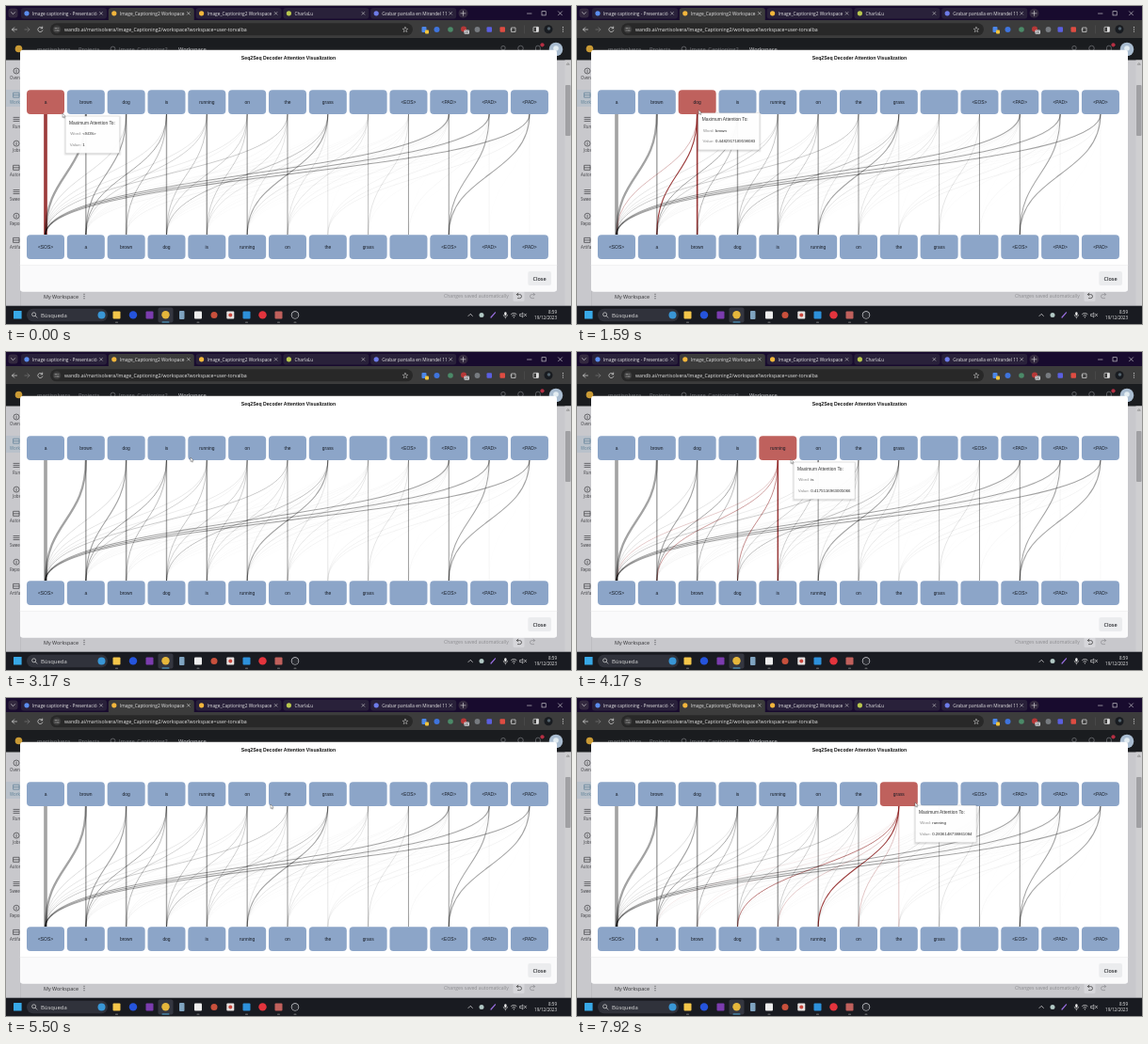
Write an HTML page that moves like this. It is 600 by 338 pixels and loops after 8 s.

```html
<!DOCTYPE html>
<html lang="es">
<head>
<meta charset="utf-8">
<title>Decoder attention</title>
<style>
html, body { margin: 0; width: 100%; height: 100%; overflow: hidden; background: #c8c8cc; }
svg { display: block; width: 100%; height: 100%; }
text { font-family: "Liberation Sans", Arial, sans-serif; white-space: pre; }
.ui text, text.ui { font-family: "Open Sans", "Noto Sans", sans-serif; }
</style>
</head>
<body>
<svg id="stage" viewBox="0 0 600 338"></svg>
<script>
const NS = 'http://www.w3.org/2000/svg';
const stage = document.getElementById('stage');

function add(parent, tag, attrs, content) {
  const el = document.createElementNS(NS, tag);
  for (const k in attrs) el.setAttribute(k, attrs[k]);
  if (content !== undefined) el.textContent = content;
  parent.appendChild(el);
  return el;
}
const group = (parent = stage, attrs = {}) => add(parent, 'g', attrs);
const rect = (g, x, y, w, h, fill, rx = 0) =>
  add(g, 'rect', { x, y, width: w, height: h, fill, rx });
const dot = (g, cx, cy, r, fill) => add(g, 'circle', { cx, cy, r, fill });
const line = (g, d, stroke, w = 0.7) =>
  add(g, 'path', { d, stroke, 'stroke-width': w, fill: 'none', 'stroke-linecap': 'round', 'stroke-linejoin': 'round' });
const ring = (g, cx, cy, r, stroke, w = 0.7) =>
  add(g, 'circle', { cx, cy, r, stroke, 'stroke-width': w, fill: 'none' });
const label = (g, str, x, y, size, fill, more = {}) =>
  add(g, 'text', { x, y, 'font-size': size, fill, ...more }, str);
const cross = (g, x, y, r, c) =>
  line(g, `M${x - r} ${y - r}l${2 * r} ${2 * r}m0 ${-2 * r}l${-2 * r} ${2 * r}`, c, 0.6);

function drawBrowser() {
  const g = group(stage, { class: 'ui' });
  rect(g, 0, 0, 600, 16, '#180b2e');
  rect(g, 0, 15, 600, 19, '#3c3c3c');
  rect(g, 2.5, 2.5, 10, 10, '#33293f', 3);
  line(g, 'M5.5 6.7l2 2l2 -2', '#ddd');
  const tabs = [
    ['Image captioning - Presentació', '#5b8def'],
    ['Image_Captioning2 Workspace', '#f2b63c'],
    ['Image_Captioning2 Workspace', '#f2b63c'],
    ['CharlaLu', '#b9c84f'],
    ['Grabar pantalla en Mirandel 11', '#6d7be8']
  ];
  tabs.forEach(([name, color], i) => {
    const x = 16 + 92.8 * i;
    if (i === 1) rect(g, x, 2, 91, 15, '#3c3c3c', 3);
    else rect(g, x, 2, 91, 11.5, '#29213a', 3);
    dot(g, x + 6, 7.8, 2.6, color);
    const clip = add(g, 'clipPath', { id: 'tab' + i });
    rect(clip, x, 0, 82, 16, '#000');
    label(g, name, x + 12, 9.6, 4.8, '#e3e3e3', { 'clip-path': `url(#tab${i})` });
    cross(g, x + 85, 7.8, 1.4, '#ccc');
  });
  dot(g, 485.5, 7.8, 5, '#33293f');
  line(g, 'M483 7.8h5M485.5 5.3v5', '#ddd', 0.6);
  line(g, 'M553.5 8h4.5', '#ddd', 0.6);
  add(g, 'rect', { x: 569, y: 5.7, width: 4.2, height: 4.2, fill: 'none', stroke: '#ddd', 'stroke-width': 0.6 });
  cross(g, 588.5, 7.8, 2, '#ddd');

  line(g, 'M11.5 25h-5m2.2 -2.2l-2.2 2.2l2.2 2.2', '#ddd');
  line(g, 'M20 25h5m-2.2 -2.2l2.2 2.2l-2.2 2.2', '#777');
  line(g, 'M38.6 23.5a2.6 2.6 0 1 0 .3 2.4m-.2 -3.9v1.8h-1.8', '#ddd');
  rect(g, 47, 18.3, 385, 13, '#282828', 6.5);
  dot(g, 54, 24.8, 4.3, '#3c3c3c');
  line(g, 'M52 23.7h2.2m1.5 0h.2M52 26h.3m1.4 0h2.4', '#ddd', 0.6);
  label(g, 'wandb.ai/martisolvera/Image_Captioning2/workspace?workspace=user-torvalba', 62, 26.9, 5.2, '#e6e6e6');
  line(g, 'M424 22.3l.8 1.9l2 .1l-1.6 1.3l.6 2l-1.8 -1.1l-1.8 1.1l.6 -2l-1.6 -1.3l2 -.1z', '#ccc', 0.5);

  rect(g, 441.5, 22, 5, 6, '#4c86e8', 1);
  rect(g, 445, 25.5, 4, 4, '#f2c53d', 1);
  dot(g, 457.5, 25, 3, '#3f74dc');
  dot(g, 472, 25, 2.8, '#4b8a68');
  dot(g, 486, 24.5, 3, '#b63838');
  rect(g, 486.5, 25.5, 5.5, 4.2, '#d9dce0', 1);
  label(g, '24', 487.2, 28.8, 3.3, '#222');
  dot(g, 500.5, 25, 2.9, '#777b80');
  rect(g, 510.5, 22.2, 5.5, 5.5, '#5a5fe0', 1);
  rect(g, 524.5, 22.2, 5.5, 5.5, '#de4c42', 1);
  line(g, 'M537 23h4v4.5h-4zM537 25h-1', '#ddd', 0.7);
  line(g, 'M550.5 21v8', '#555', 0.5);
  add(g, 'rect', { x: 560, y: 22.3, width: 5.5, height: 5.2, rx: 0.7, fill: 'none', stroke: '#ddd', 'stroke-width': 0.7 });
  rect(g, 563, 22.3, 2.5, 5.2, '#ddd');
  dot(g, 576, 24.8, 4.5, '#181b20');
  dot(g, 576.5, 24, 1.8, '#52616b');
  for (const y of [22.6, 24.8, 27]) dot(g, 591.5, y, 0.6, '#ddd');
}

function drawPage() {
  const g = group(stage, { class: 'ui' });
  rect(g, 0, 34, 600, 285, '#c8c8cc');
  rect(g, 0, 34, 600, 23.5, '#1a1c1f');
  dot(g, 13.5, 45.5, 3.8, '#c99a35');
  const ink = '#77797d';
  label(g, 'martisolvera', 33, 47.8, 6, ink);
  label(g, 'Projects', 77, 47.8, 6, ink);
  ring(g, 113.5, 45.5, 2.4, ink);
  label(g, 'Image_Captioning2', 120, 47.8, 5.8, ink);
  label(g, 'Workspace', 183, 47.8, 5.6, '#a8a9ac', { 'font-weight': 600 });
  ring(g, 528, 44.6, 2.2, ink);
  ring(g, 546.5, 45, 2.8, ink);
  line(g, 'M562.5 47v-2.5a2.4 2.4 0 0 1 4.8 0v2.5z', ink);
  dot(g, 569.5, 41.3, 2.1, '#b52f43');
  dot(g, 584, 46, 7.3, '#a9bcd0');
  dot(g, 584, 45, 2.8, '#e4edf2');

  rect(g, 0, 89, 16, 18, '#b9c1ca');
  const items = ['Overview', 'Workspace', 'Runs', 'Jobs', 'Automations', 'Sweeps', 'Reports', 'Artifacts'];
  items.forEach((name, i) => {
    const y = 69 + 25.7 * i, c = i === 1 ? '#5c7f95' : '#3f3f43';
    if (i % 3 === 0) {
      ring(g, 11, y, 3, c);
      line(g, `M11 ${y - 1}v2.5`, c);
    } else if (i % 3 === 1) {
      line(g, `M8 ${y - 2.5}h6v5h-6zM8 ${y}h6`, c);
    } else {
      line(g, `M8 ${y - 2}h6M8 ${y}h6M8 ${y + 2}h6`, c);
    }
    label(g, name, name.length > 4 ? 4 : 7, y + 9.3, 4.4, c);
  });
  line(g, 'M15.5 57V319', '#b2b2b6', 0.5);

  rect(g, 593.5, 57.5, 6.5, 261, '#cfcfd1');
  line(g, 'M595.5 62l1.3 -1.5l1.3 1.5z', '#777', 0.6);
  rect(g, 594, 84, 5.5, 54, '#a0a0a3', 1);

  label(g, 'My Workspace', 40, 310.6, 5.45, '#303033');
  for (const y of [306.2, 308.5, 310.8]) dot(g, 83, y, 0.55, '#303033');
  label(g, 'Changes saved automatically', 465, 310.4, 5.1, '#8e8e92');
  rect(g, 538.5, 303, 12, 11, '#d6d6da', 1.5);
  line(g, 'M542.5 306.6h3a2 2 0 0 1 0 4h-2m.4 -5.5l-1.5 1.5l1.5 1.5', '#333');
  line(g, 'M561.5 306.6h-3a2 2 0 0 0 0 4h2m-.4 -5.5l1.5 1.5l-1.5 1.5', '#8c8c90');
}

function drawTaskbar() {
  const g = group(stage, { class: 'ui' });
  rect(g, 0, 318.7, 600, 19.3, '#191b21');
  rect(g, 8, 324, 8.6, 8.6, '#38a9e8', 0.5);
  rect(g, 22, 321.8, 86, 13.4, '#30323b', 6.7);
  ring(g, 29.6, 327.8, 2, '#ddd');
  line(g, 'M31.1 329.3l1.8 1.8', '#ddd');
  label(g, 'Búsqueda', 37, 330.6, 5.9, '#dcdcdc');
  dot(g, 101.5, 328.4, 4, '#3996d5');
  const square = (x, c) => rect(g, x - 4, 324.4, 8, 8, c, 1);
  square(117.5, '#f3c64a');
  dot(g, 135, 328.4, 4.2, '#2554dc');
  square(152.5, '#7b3cae');
  rect(g, 161.5, 320.5, 16, 16, '#343640', 2);
  dot(g, 169.5, 328.2, 4.2, '#e5b63b');
  rect(g, 184, 324, 5.5, 9, '#7fa3c0', 1);
  square(204, '#ededed');
  dot(g, 221, 328.4, 3.5, '#c8503c');
  square(238.3, '#e6e1e0');
  dot(g, 238.3, 328.4, 2, '#cb473e');
  square(255.5, '#2d91db');
  dot(g, 272.5, 328.4, 4.2, '#e3343d');
  square(289.5, '#c0605c');
  dot(g, 307, 328.4, 4.2, '#d7d8dc');
  dot(g, 307, 328.4, 3.5, '#282a30');
  for (const x of [117.5, 204, 255.5, 289.5, 307]) rect(g, x - 1.5, 335.8, 3, 0.8, '#999', 0.4);
  rect(g, 165.5, 335.6, 8, 1, '#55aede', 0.5);

  line(g, 'M491 329.5l2.2 -2.2l2.2 2.2', '#eee');
  dot(g, 505, 328.5, 2.5, '#b1c8c4');
  line(g, 'M515 331l4.5 -5.2', '#9a6ee0', 1.2);
  rect(g, 529.3, 325.2, 2.2, 4, '#eee', 1.1);
  line(g, 'M528.2 328.3a2.2 2.2 0 0 0 4.4 0M530.4 330.7v1.3', '#eee', 0.5);
  line(g, 'M536.5 327.5a4 4 0 0 1 5.6 0m-4.3 1.6a2.1 2.1 0 0 1 3 0', '#eee');
  dot(g, 539.3, 330.8, 0.6, '#eee');
  line(g, 'M546 327.5h1.2l1.6 -1.5v5l-1.6 -1.5h-1.2zM550.5 327.2l2 2.4m0 -2.4l-2 2.4', '#eee', 0.6);
  label(g, '8:59', 585, 326.5, 4.5, '#eee', { 'text-anchor': 'end' });
  label(g, '19/12/2023', 585, 333.4, 4.5, '#eee', { 'text-anchor': 'end' });
}

const topWords = ['a', 'brown', 'dog', 'is', 'running', 'on', 'the', 'grass', '', '<EOS>', '<PAD>', '<PAD>', '<PAD>'];
const lowWords = ['<SOS>', ...topWords.slice(0, 8), '', '<EOS>', '<PAD>', '<PAD>'];
const strong = [
  { 0: 1 },
  { 0: 0.61, 1: 0.39 },
  { 0: 0.1, 1: 0.3, 2: 0.45 },
  { 0: 0.08, 1: 0.26, 2: 0.2, 3: 0.38 },
  { 0: 0.07, 1: 0.13, 3: 0.16, 4: 0.42 },
  { 0: 0.06, 3: 0.13, 4: 0.14, 5: 0.33 },
  { 0: 0.15, 4: 0.1, 5: 0.08, 6: 0.305 },
  { 3: 0.18, 4: 0.07, 5: 0.284, 6: 0.08, 7: 0.08 },
  { 5: 0.08, 6: 0.07, 8: 0.2 },
  { 8: 0.08, 9: 0.3 },
  { 0: 0.3, 10: 0.3 },
  { 0: 0.3, 10: 0.28 },
  { 0: 0.3, 10: 0.3 }
];
const tips = [
  ['<SOS>', '1'], ['<SOS>', '0.6103296279907227'],
  ['brown', '0.4482917189598083'], ['dog', '0.3826141357421875'],
  ['is', '0.4175516963005066'], ['running', '0.3318490982055664'],
  ['on', '0.3053763178329468'], ['running', '0.2836148738861084']
];
const colX = i => 42 + 42.83 * i;
const BLUE = '#8ca5c8', RED = '#bf615d';

let seed = 7;
const rnd = () => (seed = (seed * 16807) % 2147483647) / 2147483647;

drawBrowser();
drawPage();
drawTaskbar();

const modal = group();
rect(modal, 15, 46.7, 570, 256.8, '#fff', 3);
add(modal, 'path', { d: 'M15 275.5H585V300.5a3 3 0 0 1 -3 3H18a3 3 0 0 1 -3 -3z', fill: '#fafafb' });
line(modal, 'M15 275.5H585', '#e6e6e8', 0.5);
rect(modal, 554.3, 282, 24.7, 15, '#ebecee', 2);
label(modal, 'Close', 566.6, 291.5, 5.5, '#2a2c30', { 'text-anchor': 'middle', 'font-weight': 600, class: 'ui' });
label(modal, 'Seq2Seq Decoder Attention Visualization', 300, 57.3, 5.15, '#111', { 'text-anchor': 'middle', 'font-weight': 'bold' });

const linkLayer = group(modal);
const links = topWords.map((_, i) => {
  const g = group(linkLayer, { fill: 'none' });
  for (let j = 0; j <= i; j++) {
    const v = strong[i][j] || 0.004 + 0.04 * rnd() ** 2;
    const a = colX(i), b = colX(j);
    add(g, 'path', { d: `M${a} 115C${a} 179 ${b} 179 ${b} 243`, 'stroke-width': 3.7 * v });
  }
  return g;
});

function node(word, i, y) {
  const box = rect(modal, colX(i) - 20, y, 40, 25.7, BLUE, 4);
  label(modal, word, colX(i), y + 14.4, 4.9, '#161b24', { 'text-anchor': 'middle' });
  return box;
}
const topBoxes = topWords.map((w, i) => node(w, i, 89.3));
lowWords.forEach((w, i) => node(w, i, 243.2));

const tip = group();
const shade = [2, 1.2, 0.5].map(s => add(tip, 'rect', {
  x: -s, y: 0.6 - s, height: 39 + 2 * s, rx: 1.5, fill: '#000', opacity: 0.05
}));
const tipBox = add(tip, 'rect', { height: 39, rx: 1, fill: '#fff', 'fill-opacity': 0.96, stroke: '#ddd', 'stroke-width': 0.3 });
label(tip, 'Maximum Attention To:', 3.6, 8.4, 4.85, '#333');
label(tip, 'Word:', 16.5, 20.2, 4.4, '#8a8a8a', { 'text-anchor': 'end' });
label(tip, 'Value:', 16.5, 31.6, 4.4, '#8a8a8a', { 'text-anchor': 'end' });
const tipWord = label(tip, '', 17.8, 20.2, 4.4, '#222');
const tipValue = label(tip, '', 17.8, 31.6, 4.35, '#222');

const cursor = add(stage, 'path', {
  d: 'M0 0V4.6L1.1 3.6L1.8 5.2L2.5 4.9L1.8 3.3H3.2Z',
  fill: '#fff', stroke: '#444', 'stroke-width': 0.4, 'stroke-linejoin': 'round'
});

// Pointer track: step (12 per second), x, y
const track = [
  [0, 60, 114], [9, 97, 112], [10, 97, 112], [12, 109, 111], [13, 109, 111], [14, 112, 111],
  [23, 143, 110], [28, 153, 110], [33, 178, 111], [43, 214, 113], [49, 227, 114], [50, 227, 114],
  [53, 237, 114], [54, 241, 114], [60, 250, 114], [61, 250, 114], [66, 281, 113],
  [75, 300, 111], [77, 301, 111], [79, 304, 110], [80, 308, 110], [86, 320, 110],
  [88, 327, 111], [91, 338, 111], [92, 338, 111], [94, 356, 111], [95, 359, 111]
];

function pointer(step) {
  const s = Math.max(0, Math.min(95, step));
  const k = Math.max(1, track.findIndex(p => p[0] >= s));
  const a = track[k - 1], b = track[k];
  const u = (s - a[0]) / (b[0] - a[0]);
  return [a[1] + (b[1] - a[1]) * u, a[2] + (b[2] - a[2]) * u];
}

function draw(ms) {
  const step = Math.floor((ms % 8000) * 0.012 + 0.001);
  const [x, y] = pointer(step);
  // The hover reacts a little after the pointer crosses an edge
  const hit = topWords.findIndex((_, i) => x > colX(i) - 16 && x < colX(i) + 22);

  topBoxes.forEach((box, i) => box.setAttribute('fill', i === hit ? RED : BLUE));
  links.forEach((g, i) => {
    g.setAttribute('stroke', i === hit ? '#8b1a1a' : '#000');
    g.setAttribute('stroke-opacity', i === hit ? 0.85 : 0.36);
  });
  cursor.setAttribute('transform', `translate(${x} ${y})`);

  tip.setAttribute('visibility', hit < 0 ? 'hidden' : 'visible');
  if (hit < 0) return;
  const [px, py] = pointer(step - 1);
  const [word, value] = tips[hit];
  const w = value.length > 1 ? 64.5 : 57;
  tip.setAttribute('transform', `translate(${px + 3.4} ${py + 3.3})`);
  tipBox.setAttribute('width', w);
  shade.forEach((r, i) => r.setAttribute('width', w + [4, 2.4, 1][i]));
  tipWord.textContent = word;
  tipValue.textContent = value;
}

const start = performance.now();
function tick() {
  draw(performance.now() - start);
  requestAnimationFrame(tick);
}
draw(0);
requestAnimationFrame(tick);
</script>
</body>
</html>
```
